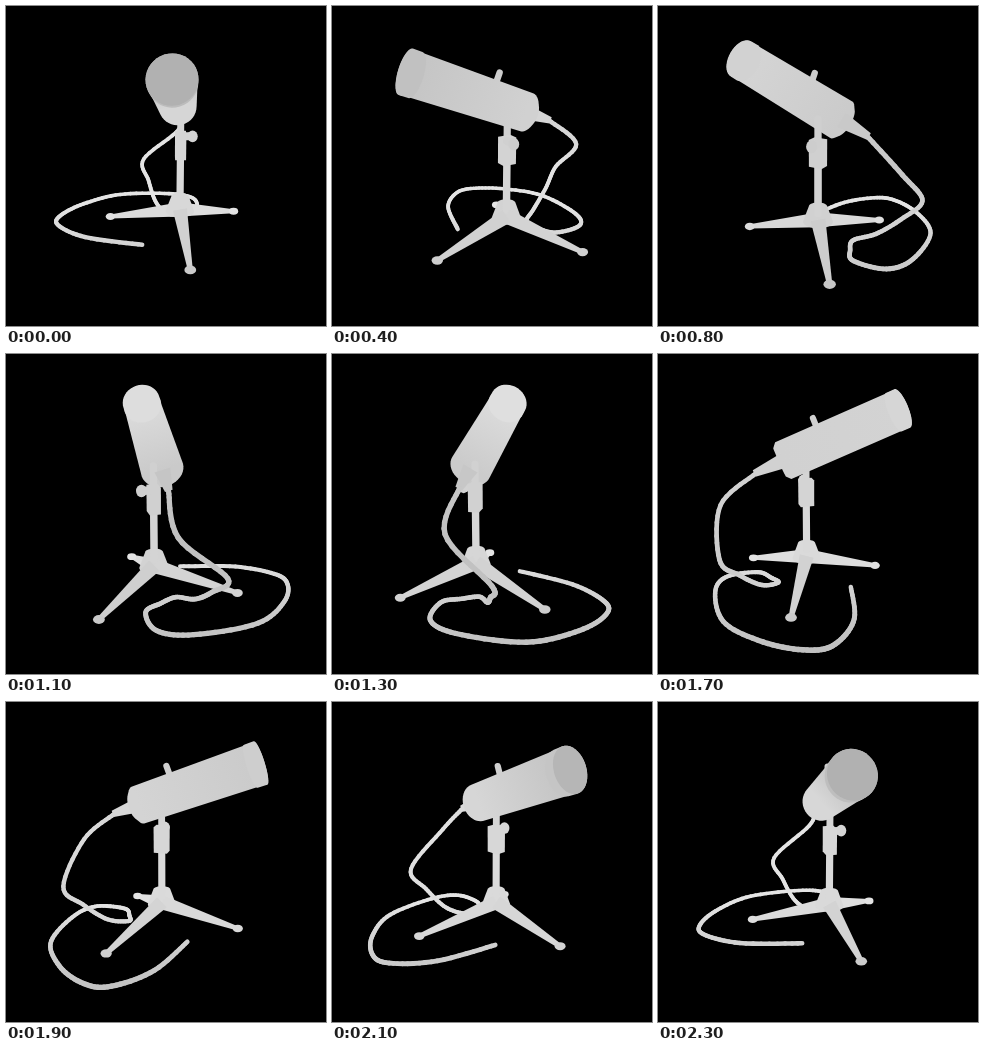
An HTML page that plays this animation: 320x320 px, repeating every 2.4 s.

```html
<!DOCTYPE html>
<html lang="en">
<head>
<meta charset="utf-8">
<title>Microphone turntable</title>
<style>
html, body { margin: 0; width: 100%; height: 100%; overflow: hidden; background: #000; }
svg { display: block; width: 100vw; height: 100vh; }
</style>
</head>
<body>
<svg id="stage" viewBox="0 0 320 320"></svg>
<script>
const stage = document.getElementById('stage');
const STEPS = 24, STEP_MS = 100, DISTANCE = 500;
const PITCH = 18 * Math.PI / 180, SIN = Math.sin(PITCH), COS = Math.cos(PITCH);

// Model space: x right, y up, z towards the viewer.
const add = (a, b, k = 1) => a.map((v, i) => v + b[i] * k);
const unit = v => { const l = Math.hypot(...v); return v.map(c => c / l); };
const cross = (a, b) => [a[1]*b[2] - a[2]*b[1], a[2]*b[0] - a[0]*b[2], a[0]*b[1] - a[1]*b[0]];
const polar = (r, deg, y) => {
  const a = deg * Math.PI / 180;
  return [r * Math.cos(a), y, r * Math.sin(a)];
};
const ring = (center, u, v, r) => Array.from({ length: 40 }, (_, i) => {
  const a = i * Math.PI / 20;
  return add(add(center, u, r * Math.cos(a)), v, r * Math.sin(a));
});

const X = [1, 0, 0], Z = [0, 0, 1];
const stand = y => [14.7, y, -8.5];

const feet = [polar(76, 73, -86), polar(76, 214, -86), polar(97, 324, -86)];
const hub = [...ring(stand(-47), X, Z, 9), ...ring(stand(-64), X, Z, 15)];
const clamp = [];
for (const y of [-5, 22]) for (const x of [-5.5, 5.5]) for (const z of [-7, 7])
  clamp.push(add(stand(y), [x, 0, z]));

const front = polar(88, 87, 91), back = [12, 43.5, -32];
const axis = unit(add(front, back, -1));
const side = unit(cross([0, 1, 0], axis));
const lift = cross(axis, side);
const disc = (center, r) => ring(center, side, lift, r);
const along = t => add(back, add(front, back, -1), t);
const face = disc(front, 20.6);
const body = [...disc(add(back, axis, -4), 15), ...disc(back, 19.6), ...disc(front, 20)];
const rim = [...face, ...disc(along(0.93), 20.6)];
const plugEnd = add(back, axis, -31);

// Hanging part first, then the loop lying on the ground.
const cablePoints = [
  [61, 283, 32], [96, 279, 2], [105, 255, -37], [86, 256, -58], [62, 259, -76],
  [42, 272, -82], [50, 291, -84], [68, 301, -84], [97, 290, -84], [106, 272, -84],
  [118, 241, -84], [123, 217, -84], [126, 199, -84], [118, 188, -84],
  [84, 172, -84], [37, 130, -84]
].map(p => polar(...p));

function spline(points, parts) {
  const out = [];
  for (let i = 0; i < points.length - 1; i++) {
    const [a, b, c, d] = [-1, 0, 1, 2].map(o =>
      points[Math.max(0, Math.min(points.length - 1, i + o))]);
    for (let j = 0; j < parts; j++) {
      const t = j / parts;
      out.push(b.map((v, n) => {
        const cubic = 3 * (v - c[n]) + d[n] - a[n];
        const square = 2 * a[n] - 5 * v + 4 * c[n] - d[n];
        return v + 0.5 * t * (c[n] - a[n] + t * (square + t * cubic));
      }));
    }
  }
  out.push(points[points.length - 1]);
  return out;
}
const cable = spline(cablePoints, 9);

function projector(angle) {
  const c = Math.cos(angle), s = Math.sin(angle);
  return ([x, y, z]) => {
    const px = x * c - z * s, pz = x * s + z * c;
    const depth = pz * COS + y * SIN, scale = DISTANCE / (DISTANCE - depth);
    return { x: 160 + px * scale, y: 150 - (y * COS - pz * SIN) * scale, depth, scale };
  };
}

function hull(points) {
  const sorted = [...points].sort((a, b) => a.x - b.x || a.y - b.y);
  const half = list => {
    const h = [];
    for (const p of list) {
      while (h.length > 1) {
        const a = h[h.length - 2], b = h[h.length - 1];
        if ((b.x - a.x) * (p.y - a.y) - (b.y - a.y) * (p.x - a.x) > 0) break;
        h.pop();
      }
      h.push(p);
    }
    return h.slice(0, -1);
  };
  return [...half(sorted), ...half(sorted.reverse())];
}

const gray = (depth, shift = 0) => {
  const v = Math.round(Math.min(228, 211 - 0.2 * depth) + shift);
  return `rgb(${v},${v},${v})`;
};
const fix = n => n.toFixed(2);
const polygon = (points, fill) =>
  `<polygon points="${points.map(p => fix(p.x) + ',' + fix(p.y)).join(' ')}" fill="${fill}"/>`;
const line = (a, b, width, fill) =>
  `<line x1="${fix(a.x)}" y1="${fix(a.y)}" x2="${fix(b.x)}" y2="${fix(b.y)}" stroke="${fill}" stroke-width="${fix(width)}"/>`;
const ellipse = (p, rx, ry) =>
  `<ellipse cx="${fix(p.x)}" cy="${fix(p.y)}" rx="${fix(rx * p.scale)}" ry="${fix(ry * p.scale)}" fill="${gray(p.depth)}"/>`;

function taper(a, b, wa, wb, fill) {
  const l = Math.hypot(b.x - a.x, b.y - a.y) || 1;
  const nx = (a.y - b.y) / l, ny = (b.x - a.x) / l;
  const at = (p, w) => ({ x: p.x + nx * w * p.scale, y: p.y + ny * w * p.scale });
  return polygon([at(a, wa), at(b, wb), at(b, -wb), at(a, -wa)], fill);
}

function draw(step) {
  const project = projector(step / STEPS * 2 * Math.PI);
  const parts = [];
  const put = (depth, markup) => parts.push({ depth, markup });
  const solid = points => polygon(hull(points.map(project)), gray(project(points[0]).depth));
  const rod = (from, to, width) => {
    const a = project(from), b = project(to);
    return line(a, b, width * a.scale, gray(a.depth));
  };

  const ends = cable.map(project);
  for (let i = 1; i < ends.length; i++) {
    const a = ends[i - 1], b = ends[i];
    put(a.depth, line(a, b, 4.5 * a.scale, gray(a.depth)));
  }

  const root = project(stand(-62));
  for (const foot of feet) {
    const tip = project(foot);
    const middle = (root.depth + tip.depth) / 2;
    put(middle, taper(root, tip, 7.5, 2.3, gray(middle)) + ellipse(tip, 5.4, 4));
  }
  put(root.depth, solid(hub));
  put(project(stand(-30)).depth, rod(stand(-55), stand(-4), 7.6));
  put(project(stand(10)).depth, rod(stand(18), stand(42), 7) + solid(clamp));

  const knob = add(stand(18), [12, 0, 0]), k = project(knob);
  put(k.depth, rod(stand(18), knob, 8) + ellipse(k, 5.2, 6));

  const b = project(back), f = project(front), p = project(plugEnd);
  put((b.depth + p.depth) / 2 - 2, taper(b, p, 7.5, 3.4, gray(p.depth)));
  const button = along(0.33);
  const facing = f.depth - b.depth;
  const gradient = `<linearGradient id="metal" gradientUnits="userSpaceOnUse" x1="${fix(b.x)}" y1="${fix(b.y)}" x2="${fix(f.x)}" y2="${fix(f.y)}">`
    + `<stop offset="0" stop-color="${gray(b.depth)}"/><stop offset="1" stop-color="${gray(f.depth)}"/></linearGradient>`;
  put((b.depth + f.depth) / 2,
    gradient + rod(add(button, lift, 15), add(button, lift, 27), 6)
    + polygon(hull(body.map(project)), 'url(#metal)') + solid(rim)
    + (facing > 70 ? polygon(face.map(project), gray(f.depth, -12)) : ''));

  parts.sort((m, n) => m.depth - n.depth);
  stage.innerHTML = '<rect width="320" height="320"/><g stroke-linecap="round" stroke-linejoin="round">'
    + parts.map(part => part.markup).join('') + '</g>';
}

const start = performance.now();
let shown = -1;
function tick() {
  const step = Math.floor((performance.now() - start) / STEP_MS) % STEPS;
  if (step !== shown) draw(shown = step);
  requestAnimationFrame(tick);
}
tick();
</script>
</body>
</html>
```
